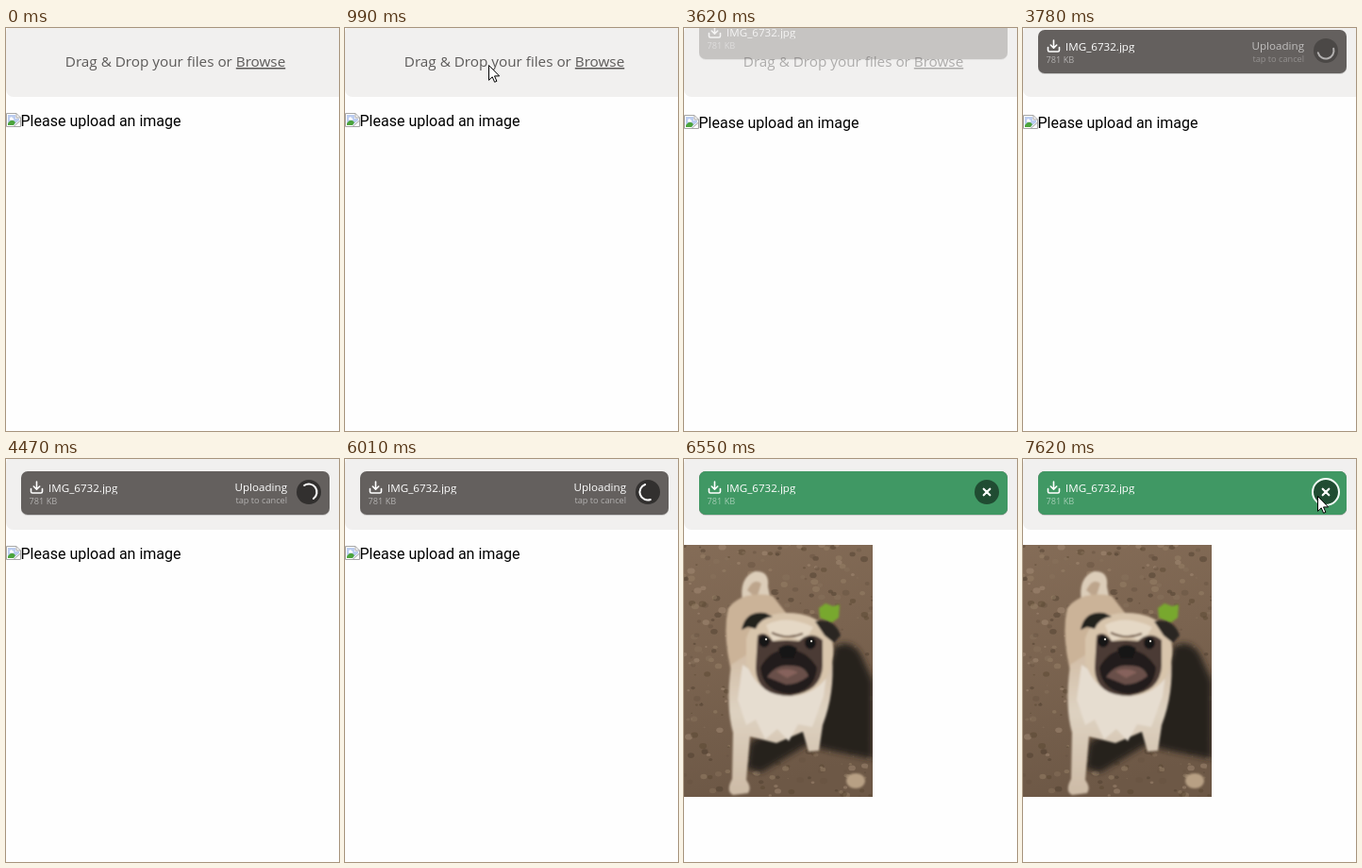
Recreate the animation shown at these times as an HTML page. Size 353x427 px, loop 8000 ms.

```html
<!DOCTYPE html>
<html lang="en">
<head>
<meta charset="utf-8">
<title>Image upload</title>
<style>
html, body { margin: 0; width: 100%; height: 100%; overflow: hidden; background: #fefefe; }
svg { display: block; width: 353px; height: 427px; }
text { font-family: "Open Sans", "Noto Sans", sans-serif; }
.name { font-size: 11.6px; fill: #fff; }
.info { font-size: 9.2px; fill: #fff; opacity: .5; }
.end { text-anchor: end; }
.line { fill: none; stroke: #fff; stroke-width: 1.6; stroke-linecap: round; stroke-linejoin: round; }
</style>
</head>
<body>
<svg viewBox="0 0 353 427">
  <defs>
    <clipPath id="nameClip"><rect x="44" y="20" width="120" height="17.3"/></clipPath>
    <clipPath id="photoClip"><rect y="91" width="200" height="267"/></clipPath>
    <linearGradient id="soil" x2="0.2" y2="1">
      <stop offset="0" stop-color="#846c57"/>
      <stop offset=".45" stop-color="#7b6450"/>
      <stop offset="1" stop-color="#6d5846"/>
    </linearGradient>
    <linearGradient id="fur" x2="0" y2="1">
      <stop offset="0" stop-color="#cdb59b"/>
      <stop offset=".5" stop-color="#ded2c1"/>
      <stop offset="1" stop-color="#cdbba6"/>
    </linearGradient>
    <filter id="soft"><feGaussianBlur stdDeviation="1"/></filter>
    <filter id="hazy"><feGaussianBlur stdDeviation="3"/></filter>
  </defs>

  <rect id="panel" y="-3" width="359" height="76" rx="8" fill="#f1f0ef"/>

  <g id="label">
    <text x="179.5" y="41" text-anchor="middle" font-size="15.25" fill="#5c5a59">Drag &amp; Drop your files or <tspan
      text-decoration="underline" style="text-decoration-color:#a7a4a4">Browse</tspan></text>
  </g>

  <g id="missing">
    <path d="M.5 90.5H11L15.5 95V104.5H.5Z" fill="#fff" stroke="#a5a5a5"/>
    <path d="M2 92H10V96H14V98L8 103H2Z" fill="#bccdf0"/>
    <path d="M2 103V101Q6 95 10 100L8 103Z" fill="#4ba43c"/>
    <path d="M4 96.5a1.5 1.5 0 0 1 3-1 1.2 1.2 0 0 1 1 2H4Z" fill="#fff"/>
    <path d="M11 90.5V95H15.5M15.5 98L8 104.5" fill="none" stroke="#a5a5a5"/>
    <text x="15.5" y="104" font-size="16" fill="#000" style="font-family:Roboto,sans-serif">Please upload an image</text>
  </g>

  <g id="photo" clip-path="url(#photoClip)">
    <rect y="91" width="200" height="267" fill="url(#soil)"/>
    <g id="dirt"></g>
    <path d="M160 198Q178 190 188 208L200 235V318L160 310 130 303 82 332 66 328 70 300 140 260Z" fill="#27211f" filter="url(#hazy)"/>
    <path d="M143 158L150 153 158 156 165 154 164 168 156 174 144 168Z" fill="#78a82f" filter="url(#soft)"/>
    <ellipse cx="182" cy="341" rx="10" ry="8" fill="#b8a084" filter="url(#soft)"/>
    <g filter="url(#soft)">
      <path d="M62 151Q58 126 75 119 91 118 89 135L94 160 60 178Z" fill="#dccdb9"/>
      <path d="M67 139Q74 125 82 132L77 148Z" fill="#bda58c"/>
      <path d="M47 158Q62 139 94 145L112 168 74 235 52 232Q40 188 47 158Z" fill="#cbb398"/>
      <path d="M50 218Q44 262 52 290L51 339Q44 352 52 356L68 354Q72 348 66 340L70 294 98 301 126 289 132 310 143 309 147 282Q160 248 157 210L108 180Z" fill="url(#fur)"/>
      <path d="M57 255L66 282 76 276 86 297 99 286 111 299 121 281 136 284 148 251 152 222 108 248 62 218Z" fill="#e6ddd0"/>
      <path d="M66 190Q74 164 108 163 142 163 154 184 164 205 151 232 134 253 108 251 75 247 66 215Z" fill="#d8c5ac"/>
      <path d="M87 176Q108 164 137 178L128 193 109 188 94 193Z" fill="#e5d8c5"/>
      <path d="M61 181Q65 160 86 163L94 167Q80 169 76 180L68 178Z" fill="#24201f"/>
      <path d="M139 172Q160 168 166 187L159 195 149 187Z" fill="#2b2524"/>
      <path d="M78 187Q86 181 94 193L109 192 122 193Q134 181 147 192L147 219Q146 246 113 251 77 251 76 222Z" fill="#4b3b34"/>
      <path d="M81 221Q91 202 109 202 129 201 141 221 139 247 111 249 83 246 81 221Z" fill="#211c1b"/>
      <path d="M88 231Q98 217 112 219 128 218 132 230 121 239 108 239Z" fill="#69504a"/>
      <path d="M98 225Q110 220 121 226L109 232Z" fill="#86625b"/>
      <ellipse cx="85" cy="193" rx="6" ry="6.5" fill="#171515"/>
      <ellipse cx="134" cy="195" rx="6" ry="6.5" fill="#171515"/>
      <path d="M100 201Q110 193 120 201L116 211 104 211Z" fill="#161414"/>
      <path d="M93 184Q109 192 126 185" fill="none" stroke="#77614f" stroke-width="2"/>
    </g>
    <circle cx="87" cy="191" r="1.2" fill="#d8d2ca"/>
    <circle cx="135" cy="193" r="1.2" fill="#d8d2ca"/>
  </g>

  <g id="item">
    <rect x="16" y="14" width="327" height="46" rx="7" opacity=".16"/>
    <rect x="16" y="13" width="327" height="46" rx="7" fill="#64605e"/>
    <rect id="done" x="16" y="13" width="327" height="46" rx="7" fill="#409864"/>
    <path class="line" d="M32.5 24V32M29.3 29L32.5 32.2 35.7 29M26.5 31.5V34.5Q26.5 36 28 36H37Q38.5 36 38.5 34.5V31.5"/>
    <g clip-path="url(#nameClip)"><text class="name" x="45" y="35">IMG_6732.jpg</text></g>
    <text class="info" x="24.5" y="47.5">781 KB</text>
    <g id="status">
      <text class="name end" x="298" y="34">Uploading</text>
      <text class="info end" x="298" y="47">tap to cancel</text>
    </g>
    <g id="button">
      <circle cx="321" cy="35" r="13" opacity=".5"/>
      <path id="spinner" class="line" style="stroke-width:2" d="M321 26.5A8.5 8.5 0 0 1 321 43.5"/>
    </g>
    <path id="cross" class="line" style="stroke-width:2.2" d="M317.7 31.7L324.3 38.3M324.3 31.7L317.7 38.3"/>
    <circle id="ring" cx="321" cy="35" r="14" fill="none" stroke="#fff" stroke-width="2"/>
  </g>

  <path id="cursor" d="M.5 .5V16.3L4.2 12.8 6.6 18.3 8.9 17.3 6.5 11.9H11.6Z" fill="#fff" stroke="#000"/>
</svg>
<script>
const LOOP = 8000, STEP = 77.15;
const $ = id => document.getElementById(id);
const parts = {};
for (const id of ["panel", "label", "missing", "photo", "item", "done", "status",
  "button", "spinner", "cross", "ring", "cursor"]) parts[id] = $(id);

// Seeded specks of soil
let seed = 7;
const rnd = () => (seed = seed * 16807 % 2147483647) / 2147483647;
const tones = ["#9c846b", "#57442f", "#a8917a", "#665240", "#8a735d", "#4b3b2d"];
let specks = "";
for (let i = 0; i < 420; i++) {
  const r = 0.6 + rnd() * 2.6;
  specks += `<ellipse cx="${(rnd() * 200).toFixed(1)}" cy="${(91 + rnd() * 267).toFixed(1)}" ` +
    `rx="${(r * 1.3).toFixed(1)}" ry="${r.toFixed(1)}" fill="${tones[i % 6]}" opacity=".45"/>`;
}
$("dirt").innerHTML = specks;

// Linear value between [step, value] pairs
function at(keys, k) {
  if (k <= keys[0][0]) return keys[0][1];
  for (let i = 1; i < keys.length; i++) {
    const [a, u] = keys[i - 1], [b, v] = keys[i];
    if (k <= b) return u + (v - u) * (k - a) / (b - a);
  }
  return keys[keys.length - 1][1];
}

const ease = p => 1 - (1 - p) ** 2;
const glide = (k, from, to, a, b) => {
  const p = ease(Math.min(1, (k - a) / (b - a)));
  return [a[0], a[1], from[0] + (to[0] - from[0]) * p, from[1] + (to[1] - from[1]) * p];
};

function travel(k, first, last, from, to) {
  const p = ease(Math.min(1, (k - first) / (last - first)));
  return from.map((v, i) => v + (to[i] - v) * p);
}

function pointer(k) {
  if (k >= 4 && k < 14) return travel(k, 4, 13, [272, 353], [152, 39]);
  if (k >= 14 && k < 20) return travel(k, 14, 17, [152, 39], [173, 43]);
  if (k >= 25 && k < 27) return [[164, 46], [96, 51]][k - 25];
  if (k >= 90) return travel(k, 90, 99, [82, 140], [312, 39]);
  return null;
}

const fade = (el, v) => el.setAttribute("opacity", v);
const move = (el, x, y) => el.setAttribute("transform", `translate(${x} ${y})`);

function draw(t) {
  const k = Math.floor((t + 18) / STEP);
  parts.panel.setAttribute("height", at([[49, 76], [51, 78]], k));

  fade(parts.label, at([[46, 1], [47, .45], [48, 0]], k));
  move(parts.missing, 0, k < 47 ? 0 : 2);
  fade(parts.missing, k < 79 ? 1 : 0);
  fade(parts.photo, k < 79 ? 0 : 1);

  fade(parts.item, at([[46, 0], [47, .3], [48, .75], [49, 1]], k));
  move(parts.item, 0, at([[47, -26], [49, -11], [51, -4], [53, -1], [55, 0]], k));
  fade(parts.done, at([[79, 0], [83, 1]], k));
  fade(parts.status, at([[47, 0], [49, .6], [53, 1], [79, 1], [83, 0]], k));
  fade(parts.button, at([[47, 0], [49, .5], [53, 1]], k));

  fade(parts.spinner, at([[79, 1], [82, 0]], k));
  const turn = -35 + (k - 58) * STEP * .36;
  parts.spinner.setAttribute("transform", `rotate(${turn} 321 35)`);
  fade(parts.cross, at([[81, 0], [85, 1]], k));
  fade(parts.ring, at([[96, 0], [99, .95]], k));

  const spot = pointer(k);
  fade(parts.cursor, spot ? 1 : 0);
  if (spot) move(parts.cursor, Math.round(spot[0]), Math.round(spot[1]));
}

function frame() {
  draw(performance.now() % LOOP);
  requestAnimationFrame(frame);
}
frame();
</script>
</body>
</html>
```
